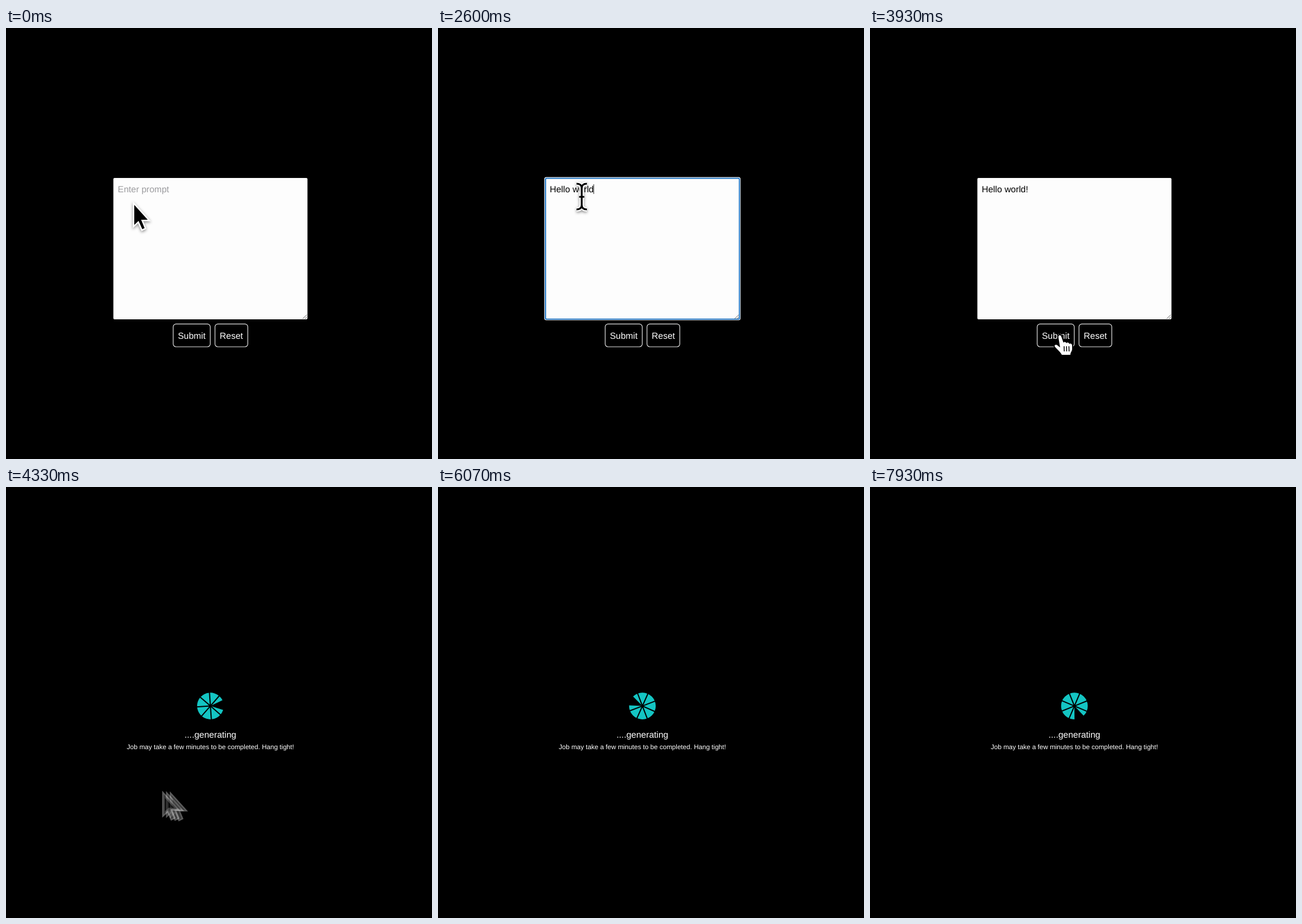
An HTML page with a canvas for the animation above (8000 ms loop, 744 px wide and 753 px high).

```html
<!DOCTYPE html>
<html lang="en">
<head>
<meta charset="utf-8">
<title>Prompt form</title>
<style>
  html, body { margin: 0; width: 100%; height: 100%; overflow: hidden; background: #000; }
  canvas { display: block; width: 744px; height: 753px; }
</style>
</head>
<body>
<canvas id="stage" width="744" height="753"></canvas>
<script>
const ctx = document.getElementById('stage').getContext('2d');
const LOOP = 8000, STEP = 1000 / 15;
const FONT = '"Liberation Sans", Arial, sans-serif';
const PROMPT = 'Hello world!';
const FOCUS = 800, TYPE = 1800, CLICK = 3860, SUBMITTED = 4120, GONE = 4900;

// Pointer path: time, x, y of the hot spot
const PATH = [
  [400, 222, 303], [1130, 251, 294], [3320, 251, 294], [3800, 331, 537],
  [4130, 331, 537], [4330, 275, 531], [4800, 33, 543]
];
const ARROW = [[2, 6], [2, 41], [9.5, 34], [16, 48.5], [20, 46.5], [14, 32], [25.5, 32]];

const clamp = (v, a, b) => Math.min(b, Math.max(a, v));

function pointerAt(t) {
  let i = 0;
  while (i < PATH.length - 2 && t > PATH[i + 1][0]) i++;
  const [t0, x0, y0] = PATH[i], [t1, x1, y1] = PATH[i + 1];
  let p = clamp((t - t0) / (t1 - t0), 0, 1);
  if (t < SUBMITTED) p = p * p * (3 - 2 * p);
  return [x0 + (x1 - x0) * p, y0 + (y1 - y0) * p];
}

function typedCount(t) {
  if (t < TYPE) return 0;
  if (t < 2000) return 1;
  if (t < 2130) return 2;
  if (t < 2865) return Math.min(11, Math.floor(3.01 + (t - 2133) / STEP * 8 / 7));
  return 12;
}

function text(str, x, y, size, color, align = 'left') {
  ctx.font = `${size}px ${FONT}`;
  ctx.textAlign = align;
  ctx.fillStyle = color;
  ctx.fillText(str, x, y);
}

function box(x0, y0, x1, y1, r, fill, stroke) {
  ctx.beginPath();
  ctx.roundRect(x0, y0, x1 - x0, y1 - y0, r);
  if (fill) { ctx.fillStyle = fill; ctx.fill(); }
  if (stroke) { ctx.strokeStyle = stroke; ctx.lineWidth = 1.2; ctx.stroke(); }
}

function drawForm(t) {
  const focused = t >= FOCUS && t < CLICK;
  if (focused) {
    box(185.6, 260.6, 528.4, 510.6, 3.5, '#f4f8fc');
    box(186.8, 261.7, 527.3, 509.5, 2.5, '#0c68bd');
    box(188.7, 263.6, 525.5, 507.7, 1, '#fdfdfd');
  } else {
    box(187.5, 262, 526.5, 509, 2, '#fdfdfd');
  }

  const typed = PROMPT.slice(0, typedCount(t));
  if (typed) text(typed, 195.3, 287, 15.5, '#000');
  else text('Enter prompt', 195.3, 287, 15.5, '#9c9c9f');
  if (focused) {
    ctx.font = `15.5px ${FONT}`;
    ctx.fillStyle = '#222';
    ctx.fillRect(195.3 + ctx.measureText(typed).width - 0.5, 273, 1, 17);
  }

  ctx.strokeStyle = '#666';
  ctx.lineWidth = 1;
  ctx.beginPath();
  ctx.moveTo(518, 508); ctx.lineTo(525.5, 501);
  ctx.moveTo(522, 508); ctx.lineTo(525.5, 505);
  ctx.stroke();

  box(292, 517.2, 356.7, 557, 5, null, '#e4e4e4');
  box(365, 517.2, 422.3, 557, 5, null, '#e4e4e4');
  text('Submit', 324.4, 543, 15.5, '#fff', 'center');
  text('Reset', 393.6, 543, 15.5, '#fff', 'center');
}

function drawWheel(t) {
  const rad = Math.PI / 180;
  const turn = (120 * (t - 4333) / 1000 - 4) * rad;
  ctx.save();
  ctx.translate(357, 382.6);
  ctx.rotate(turn);
  ctx.fillStyle = '#14c5c3';
  ctx.beginPath();
  ctx.moveTo(0, 0);
  ctx.arc(0, 0, 23.3, 21.5 * rad, 338.5 * rad);
  ctx.fill();
  ctx.strokeStyle = '#000';
  ctx.lineWidth = 2;
  ctx.beginPath();
  for (let k = 1; k < 8; k++) {
    ctx.moveTo(0, 0);
    ctx.lineTo(25 * Math.cos(k * 45 * rad), 25 * Math.sin(k * 45 * rad));
  }
  ctx.stroke();
  ctx.restore();
}

function drawWaiting(t) {
  drawWheel(t);
  text('....generating', 357, 438.3, 15.5, '#fff', 'center');
  text('Job may take a few minutes to be completed. Hang tight!', 357, 458, 11.6, '#fff', 'center');
}

function shadow(on) {
  ctx.shadowColor = on ? 'rgba(0,0,0,0.45)' : 'transparent';
  ctx.shadowBlur = on ? 5 : 0;
  ctx.shadowOffsetY = on ? 2 : 0;
}

function outlined(path, fill, halo, line) {
  ctx.strokeStyle = '#fff';
  ctx.lineWidth = halo;
  shadow(true);
  ctx.stroke(path);
  shadow(false);
  if (fill) { ctx.fillStyle = '#000'; ctx.fill(path); }
  if (line) { ctx.strokeStyle = '#000'; ctx.lineWidth = line; ctx.stroke(path); }
}

function arrow() {
  const p = new Path2D();
  ARROW.forEach(([x, y]) => p.lineTo(x, y));
  p.closePath();
  ctx.lineJoin = 'miter';
  outlined(p, true, 5);
}

function beam() {
  const p = new Path2D(
    'M-9 -22C-4 -22 0 -20 0 -14C0 -20 4 -22 9 -22M0 -15V16' +
    'M-9 23C-4 23 0 21 0 15C0 21 4 23 9 23M-4.5 1H4.5');
  ctx.lineJoin = 'round';
  outlined(p, false, 7.5, 3.2);
}

function hand() {
  const p = new Path2D(
    'M-2 3C-2 -1 2 -1 3 2L7 13C8 11 11 11 12 14C13 12 16 12 17 15' +
    'C19 13 22 15 22 18V24C22 28 19 29 19 34H4C2 29 -4 25 -8 20' +
    'C-10 17 -6 15 -3 18L1 21Z');
  ctx.lineJoin = 'round';
  ctx.strokeStyle = '#000';
  ctx.lineWidth = 4;
  ctx.stroke(p);
  ctx.fillStyle = '#fff';
  ctx.fill(p);
  ctx.lineWidth = 1.5;
  ctx.beginPath();
  for (const x of [8, 12.2, 16.4]) { ctx.moveTo(x, 19); ctx.lineTo(x + 0.3, 28); }
  ctx.stroke();
}

function drawPointer(t) {
  if (t >= GONE) return;
  const [x, y] = pointerAt(t), [px, py] = pointerAt(t - 45);
  const blurred = Math.hypot(x - px, y - py) > 6;
  const onField = t > 440 && t < SUBMITTED && y < 509;
  const onButton = t < SUBMITTED && y > 517;
  const shape = onField ? beam : onButton ? hand : arrow;
  const ghosts = blurred ? 3 : 1;
  for (let i = ghosts - 1; i >= 0; i--) {
    ctx.save();
    ctx.globalAlpha = blurred ? 0.36 : 1;
    ctx.translate(x + (px - x) * i / 2, y + (py - y) * i / 2);
    shape();
    ctx.restore();
  }
}

function frame(now) {
  const t = Math.floor((now % LOOP + 4) / STEP) % 120 * STEP;
  ctx.fillStyle = '#000';
  ctx.fillRect(0, 0, 744, 753);
  if (t < SUBMITTED) drawForm(t);
  else drawWaiting(t);
  drawPointer(t);
  requestAnimationFrame(frame);
}

ctx.textRendering = 'geometricPrecision';
requestAnimationFrame(frame);
</script>
</body>
</html>
```
